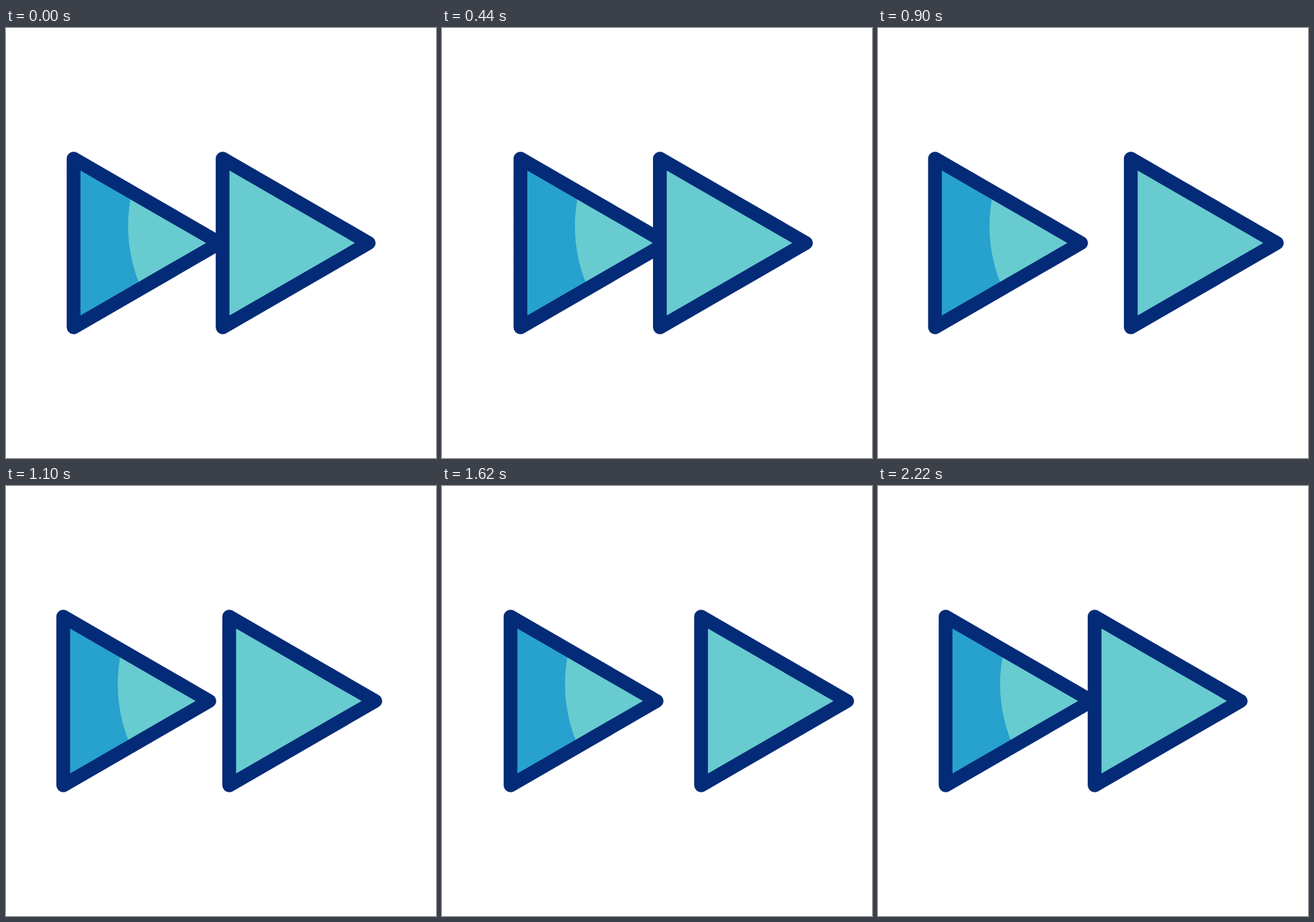
Recreate the animation shown at these times as an HTML page. Size 640x640 px, loop 3020 ms.

```html
<!DOCTYPE html>
<html lang="en">
<head>
<meta charset="utf-8">
<title>Fast forward</title>
<style>
  html, body { margin: 0; width: 100%; height: 100%; overflow: hidden; background: #fff; }
  svg { display: block; width: 100%; height: 100%; }
  .edge { fill: none; stroke: #042b77; stroke-width: 20.48; stroke-linejoin: round; }
  .light { fill: #68cbd0; }
  .shade { fill: #27a1cd; }
</style>
</head>
<body>
<svg viewBox="0 0 640 640">
  <defs>
    <path id="tri" d="M100.6 194.4V445.6L318 320Z"/>
    <clipPath id="inside"><use href="#tri"/></clipPath>
  </defs>
  <g id="left">
    <use href="#tri" class="shade"/>
    <circle class="light" cx="408.7" cy="295" r="227" clip-path="url(#inside)"/>
    <use href="#tri" class="edge"/>
  </g>
  <g id="right">
    <use href="#tri" class="light"/>
    <use href="#tri" class="edge"/>
  </g>
</svg>
<script>
  const LOOP = 3020;
  const BEAT = 400;       // one swing, in ms
  const SWING = 64;       // width of a swing, in px
  const BACK = 25.6;      // how far the left arrow pulls back
  const GAP = 221.8;      // distance between the arrows at rest

  const left = document.getElementById('left');
  const right = document.getElementById('right');

  // Eased shift by dist that begins at start and lasts span
  function shift(t, start, span, dist) {
    const x = Math.min(1, Math.max(0, (t - start) / span));
    return dist * x * x * (3 - 2 * x);
  }

  // A number of swings, forward and back in turn
  function swings(t, start, count) {
    let sum = 0;
    for (let i = 0; i < count; i++) {
      sum += shift(t, start + i * BEAT, BEAT, i % 2 ? -SWING : SWING);
    }
    return sum;
  }

  function leftX(t) {
    return shift(t, 0, BEAT / 2, -BACK) + swings(t, BEAT / 2, 4)
         + shift(t, BEAT * 4.5, BEAT, BACK);
  }

  function rightX(t) {
    const over = SWING - BACK;
    return swings(t, BEAT, 3) + shift(t, BEAT * 4, BEAT, -SWING - over)
         + shift(t, BEAT * 5, BEAT / 2, over);
  }

  function draw(now) {
    const t = now % LOOP;
    left.setAttribute('transform', `translate(${leftX(t)} 0)`);
    right.setAttribute('transform', `translate(${GAP + rightX(t)} 0)`);
    requestAnimationFrame(draw);
  }

  draw(0);
</script>
</body>
</html>
```
